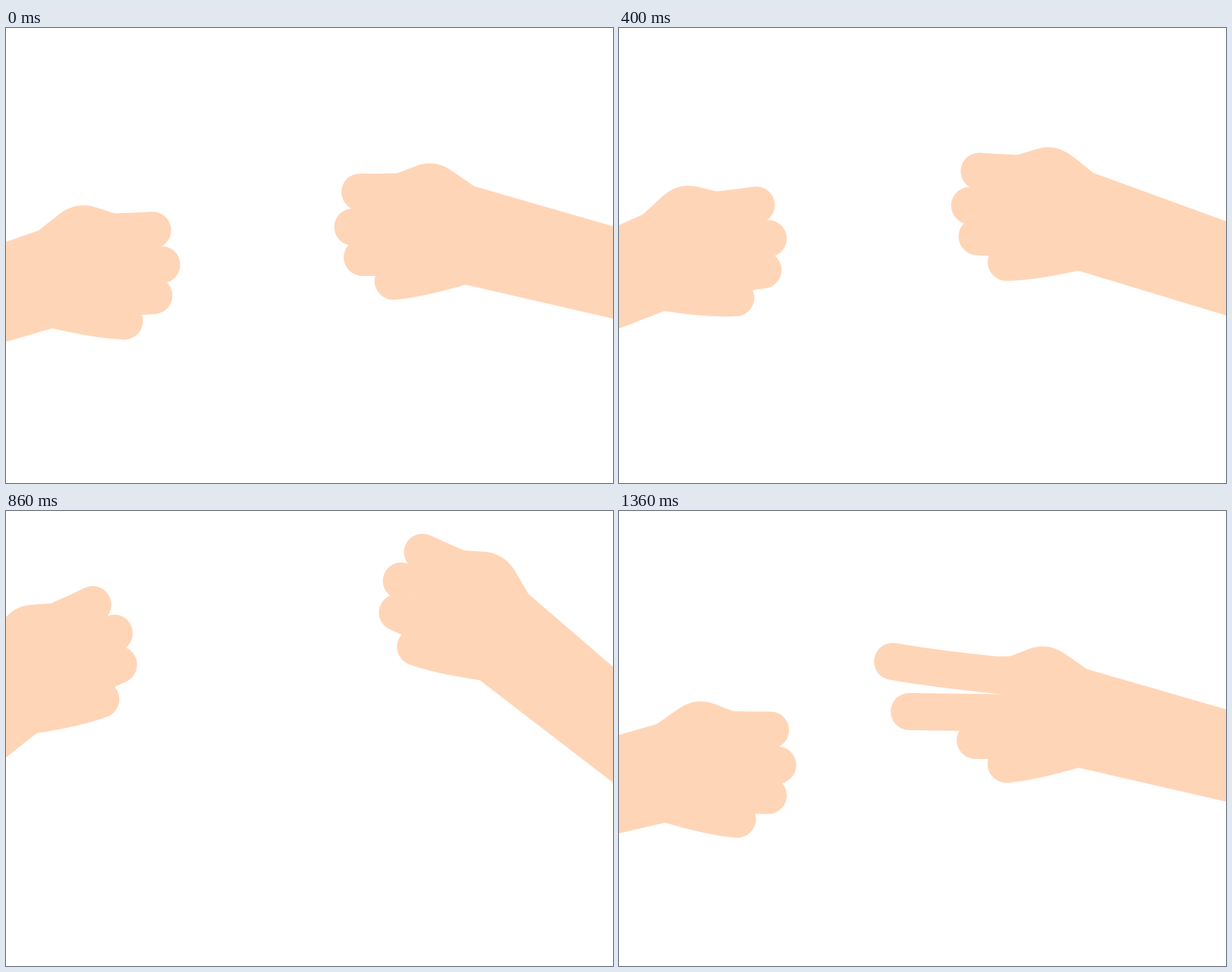
These frames come from a looping animation (800 by 600 pixels, 1380 ms). An HTML page with a canvas:

```html
<!DOCTYPE html>
<html>
<head>
<meta charset="utf-8">
<style>
  html, body { margin: 0; height: 100%; overflow: hidden; background: #fff; }
  canvas { display: block; }
</style>
</head>
<body>
<canvas id="stage" width="800" height="600"></canvas>
<script>
const ctx = document.getElementById('stage').getContext('2d');
const LOOP = 1380, FRAME = 20, RIGHT_DELAY = 40;
const SKIN = '#ffd5b7';
const PIVOT = { x: 880, y: 324 };
const REST = 8.35, LOW = 0.47, HIGH = 16.8, TOP = 33.6, THROW = 5.6; // degrees

const clamp = (v, min, max) => Math.min(max, Math.max(min, v));
const mix = (a, b, u) => a + (b - a) * u;

// Quick start with a long settle, and its time reversal
const settle = u => {
  const s = 1 - (1 - u) ** 2.25;
  return s * s * (3 - 2 * s);
};
const drop = u => 1 - settle(1 - u);

// Two shakes, a big swing held at the top, the throw, back to rest
const MOVES = [
  { from: -30, to: 113, angle: HIGH, ease: settle },
  { from: 113, to: 300, angle: LOW, ease: drop },
  { from: 300, to: 461, angle: HIGH, ease: settle },
  { from: 461, to: 620, angle: LOW, ease: drop },
  { from: 620, to: 920, angle: TOP, ease: settle },
  { from: 990, to: 1200, angle: THROW, ease: settle },
  { from: 1200, to: 1330, angle: REST, ease: settle }
];
const armAngle = t => MOVES.reduce((angle, m) =>
  mix(angle, m.angle, m.ease(clamp((t - m.from) / (m.to - m.from), 0, 1))), REST);

// 0 fist, 1 fingers whipping out, 2 straight
const opening = t => clamp((t - 1020) / 100, 0, 2);

// Each pose: tip x, y, bend x, y
const INDEX = { base: [540, 220], poses: [[467, 216, 500, 216], [376.5, 216.5, 430, 203], [361, 198, 430, 210]] };
const MIDDLE = { base: [530, 266], poses: [[457.5, 262, 490, 262], [394, 270.7, 440, 264], [383, 264, 440, 265]] };

const body = new Path2D(`M617 208 L587 187 C571 177 555 175 537 183 L516 191
  L467 192 L503 241 L487 327 L486 333 A25 25 0 0 0 511 358 Q548 355 606 338
  L1000 429 L1000 319 Z`);

function finger({ base, poses }, open) {
  const i = Math.min(1, Math.floor(open));
  const [x, y, bendX, bendY] = poses[i].map((v, k) => mix(v, poses[i + 1][k], open - i));
  ctx.beginPath();
  ctx.moveTo(x, y);
  ctx.quadraticCurveTo(bendX, bendY, ...base);
  ctx.stroke();
}

function hand(angle, open) {
  ctx.translate(PIVOT.x, PIVOT.y);
  ctx.rotate((angle - REST) * Math.PI / 180);
  ctx.translate(-PIVOT.x, -PIVOT.y);
  ctx.fill(body);
  finger(INDEX, open);
  finger(MIDDLE, open);
  ctx.beginPath();
  ctx.moveTo(470, 302);
  ctx.lineTo(515, 302);
  ctx.stroke();
}

function draw(t) {
  ctx.setTransform(1, 0, 0, 1, 0, 0);
  ctx.fillStyle = '#fff';
  ctx.fillRect(0, 0, 800, 600);
  ctx.fillStyle = ctx.strokeStyle = SKIN;
  ctx.lineWidth = 49;
  ctx.lineCap = 'round';
  ctx.translate(-0.4, 0.4);
  hand(armAngle(t - RIGHT_DELAY), opening(t));
  ctx.setTransform(-1, 0, 0, 1, 666.6, 73);
  hand(armAngle(t), 0);
}

const start = performance.now();
function tick() {
  const t = (performance.now() - start) % LOOP;
  draw(Math.floor(t / FRAME) * FRAME);
  requestAnimationFrame(tick);
}
tick();
</script>
</body>
</html>
```
